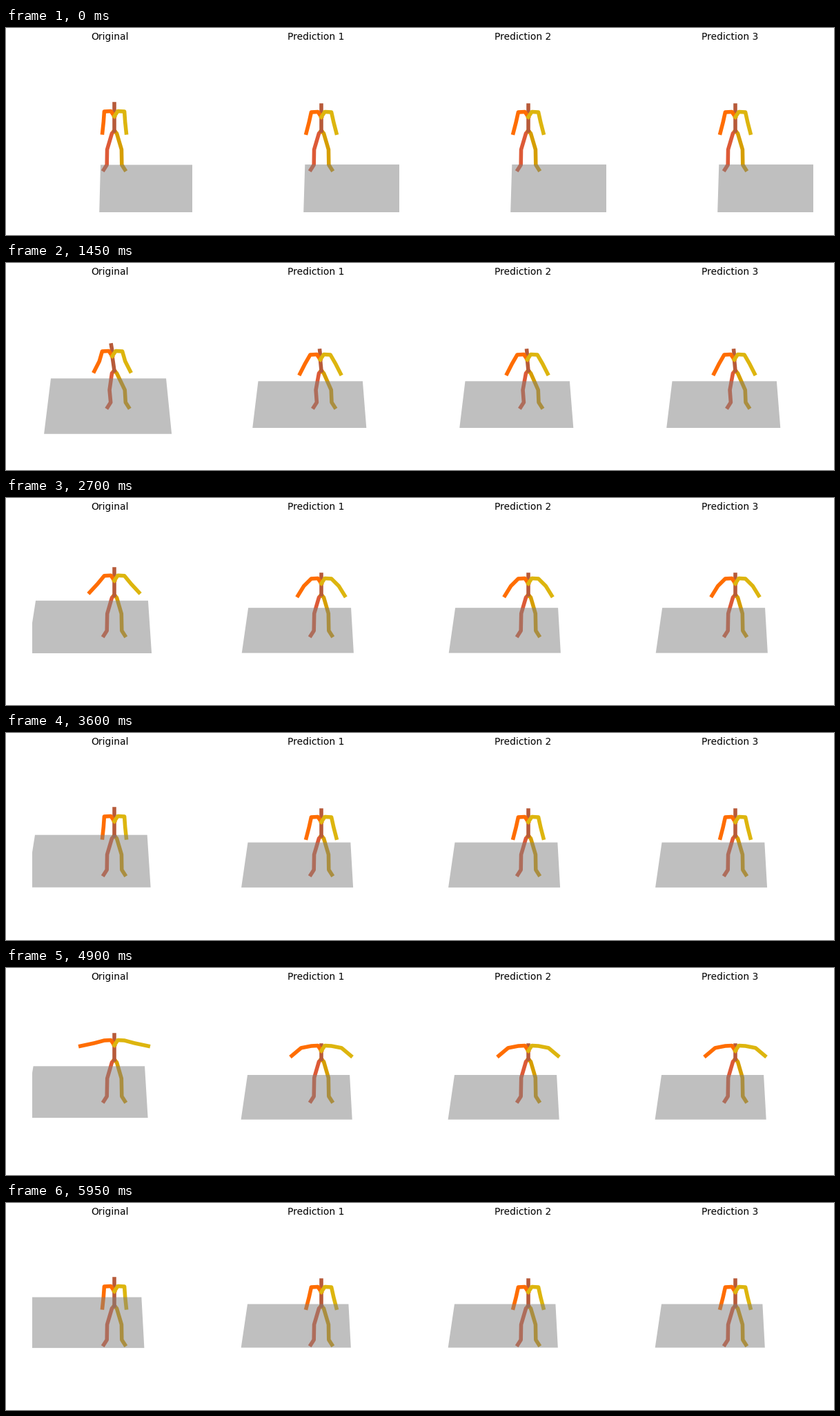
Recreate the animation shown at these times as a matplotlib script. Size 1200 by 300 pixels, loop 6 s.

```python
import numpy as np
import matplotlib.pyplot as plt
from matplotlib.animation import FuncAnimation
from matplotlib.patches import Polygon, Rectangle

plt.rcParams["font.family"] = "DejaVu Sans"

STEP, LOOP = 50, 6000
PANEL = 300
HORIZON = -580
CENTER = 157
COLORS = ["#DD5A37", "#D69E00", "#B75A39", "#FF6D00", "#DDB50E"]


def pose(root, torso, neck, upper, fore, foot=204, step=0, lean=0):
    """Hip height, lengths, arm angles in degrees, feet height and drift."""
    return np.array([root, torso, neck, upper, fore, foot, step, lean], float)


def mix(a, b, amount):
    return a + (b - a) * amount


def swing(point, side, length, degrees):
    angle = np.radians(degrees)
    return point + length * np.array([side * np.sin(angle), np.cos(angle)])


def arm(chest, side, upper, fore):
    collar = chest + (side * 5, -7.5)
    shoulder = chest + (side * 14.6, -7)
    elbow = swing(shoulder, side, 15, upper)
    reach = 16 + 5 * np.sin(np.radians(fore)) ** 4
    return [chest, collar, shoulder, elbow, swing(elbow, side, reach, fore)]


def leg(root, side, foot, step):
    bend = max(0, 57 - (foot - root[1]))
    hip = root + (side * 3.5, 3.7)
    knee = root + (side * (10.3 + 0.2 * bend) + 0.75 * step, 27 + 0.25 * bend)
    ankle = (root[0] + side * 10.8 + step, foot - 7)
    toe = (root[0] + side * 15.3 + step, foot)
    return [root, hip, knee, ankle, toe]


def skeleton(params):
    root_y, torso, neck, upper, fore, foot, step, lean = params
    root = np.array([CENTER, root_y])
    chest = root + (lean, -torso)
    spine = [root, chest, chest + (lean * 0.1, -0.55 * neck),
             chest + (lean * 0.5, -neck)]
    return [leg(root, -1, foot, step), leg(root, 1, foot, step), spine,
            arm(chest, -1, upper, fore), arm(chest, 1, upper, fore)]


def ground(left, back, width, depth):
    """Corners of a floor rectangle seen in perspective."""
    right = left + width * (back - HORIZON)
    front = HORIZON + 1 / (1 / (back - HORIZON) - depth)
    scale = (front - HORIZON) / (back - HORIZON)
    near_left, near_right = (CENTER + (x - CENTER) * scale for x in (left, right))
    return np.array([(left, back), (right, back),
                     (near_right, front), (near_left, front)])


class Track:
    """Monotone cubic interpolation through timed keys."""

    def __init__(self, keys):
        self.times = np.array([t for t, _ in keys], float)
        self.values = np.array([v for _, v in keys], float)
        slope = np.diff(self.values, axis=0) / np.diff(self.times)[:, None]
        before, after = slope[:-1], slope[1:]
        same = before * after > 0
        total = np.where(same, before + after, 1)
        self.tangents = np.zeros_like(self.values)
        self.tangents[1:-1] = np.where(same, 2 * before * after / total, 0)

    def __call__(self, t):
        i = np.searchsorted(self.times, t, side="right") - 1
        h = self.times[i + 1] - self.times[i]
        u = (t - self.times[i]) / h
        a, b = self.values[i:i + 2]
        ta, tb = self.tangents[i:i + 2] * h
        return ((2*u**3 - 3*u**2 + 1) * a + (u**3 - 2*u**2 + u) * ta
                + (3*u**2 - 2*u**3) * b + (u**3 - u**2) * tb)


def body_track(stand, crouch, land, dip, jump):
    half = mix(dip, crouch, 0.5)
    launch = mix(stand, jump, 0.25)
    leap = mix(stand, jump, 0.5)
    return Track([
        (0, stand), (250, stand), (750, crouch), (900, crouch),
        (1030, launch), (1170, leap), (1450, land), (1900, stand),
        (2150, dip), (2350, half), (2480, launch), (2600, jump),
        (2750, launch), (2880, dip), (3250, stand), (3950, stand),
        (4500, half), (4700, launch), (4880, jump), (4920, jump),
        (5050, launch), (5200, dip), (5700, stand), (LOOP, stand)])


def ground_track(*stops):
    start, back, landed, second, third, flight, final = map(np.array, stops)
    return Track([
        (0, start), (350, start), (750, back), (930, back),
        (1350, mix(landed, back, 0.1)), (1450, landed),
        (1900, mix(second, landed, 0.3)), (2150, second), (2380, second),
        (2760, third), (3950, third), (4500, third + (-2, 2)), (4650, third),
        (4900, flight), (5180, mix(final, flight, 0.15)), (5700, final),
        (LOOP, final)])


real = dict(
    body=body_track(
        stand=pose(149, 21, 18.5, 4, 6, foot=205.3),
        crouch=pose(156, 10, 12, 15, 6, step=-4),
        land=pose(156, 21, 16, 16, 27, foot=209, step=5.5, lean=-3),
        dip=pose(150, 16, 12.5, 6, 4, step=-2.3),
        jump=pose(133, 21, 15.5, 75, 78, foot=193)),
    floor=ground_track((137, 198.3), (133, 198.8), (65, 167.3), (57.7, 163.3),
                       (42, 147.7), (39.6, 142.3), (36.2, 136.5)),
    size=(0.2235, 1.3e-4))

model = dict(
    body=body_track(
        stand=pose(149, 20, 17, 12.5, 14.5, foot=205.3),
        crouch=pose(152, 14, 11, 14.5, 12, step=-3.5),
        land=pose(156, 16, 13, 30, 27, foot=209, step=4.2, lean=-1.5),
        dip=pose(149, 17, 14, 17, 18),
        jump=pose(132, 12, 8, 79, 50, foot=193)),
    floor=ground_track((133.3, 197.8), (130.3, 197.5), (65.5, 171.3), (59.7, 167.2),
                       (50.5, 158.6), (50, 155), (50, 146.5)),
    size=(0.2015, 1.1e-4))


class Panel:
    def __init__(self, ax, index, title, title_x, body, floor, size):
        self.x0 = index * PANEL
        self.body, self.floor, self.size = body, floor, size
        self.lines = [ax.plot([], [], color=c, lw=4, zorder=2)[0] for c in COLORS]
        self.plane = Polygon(np.zeros((4, 2)), fc=(0.5, 0.5, 0.5, 0.5),
                             ec="none", lw=0, zorder=3)
        ax.add_patch(self.plane)
        window = Rectangle((self.x0 + 38, 33), 232, 234, transform=ax.transData)
        self.plane.set_clip_path(window)
        ax.text(self.x0 + title_x, 17, title, fontsize=10, ha="center",
                va="baseline", color="black")

    def draw(self, t):
        for line, chain in zip(self.lines, skeleton(self.body(t))):
            x, y = np.transpose(chain)
            line.set_data(x + self.x0, y)
        self.plane.set_xy(ground(*self.floor(t), *self.size) + (self.x0, 0))
        return self.lines + [self.plane]


fig = plt.figure(figsize=(12, 3), dpi=100, facecolor="white")
ax = fig.add_axes([0, 0, 1, 1])
ax.axis("off")

panels = [Panel(ax, 0, "Original", 150, **real)]
panels += [Panel(ax, k, f"Prediction {k}", 149, **model) for k in (1, 2, 3)]
ax.set_xlim(0, 1200)
ax.set_ylim(300, 0)


def update(frame):
    return [artist for panel in panels for artist in panel.draw(frame * STEP)]


anim = FuncAnimation(fig, update, frames=LOOP // STEP, interval=STEP,
                     repeat=True, repeat_delay=0, blit=False)
plt.show()
```
